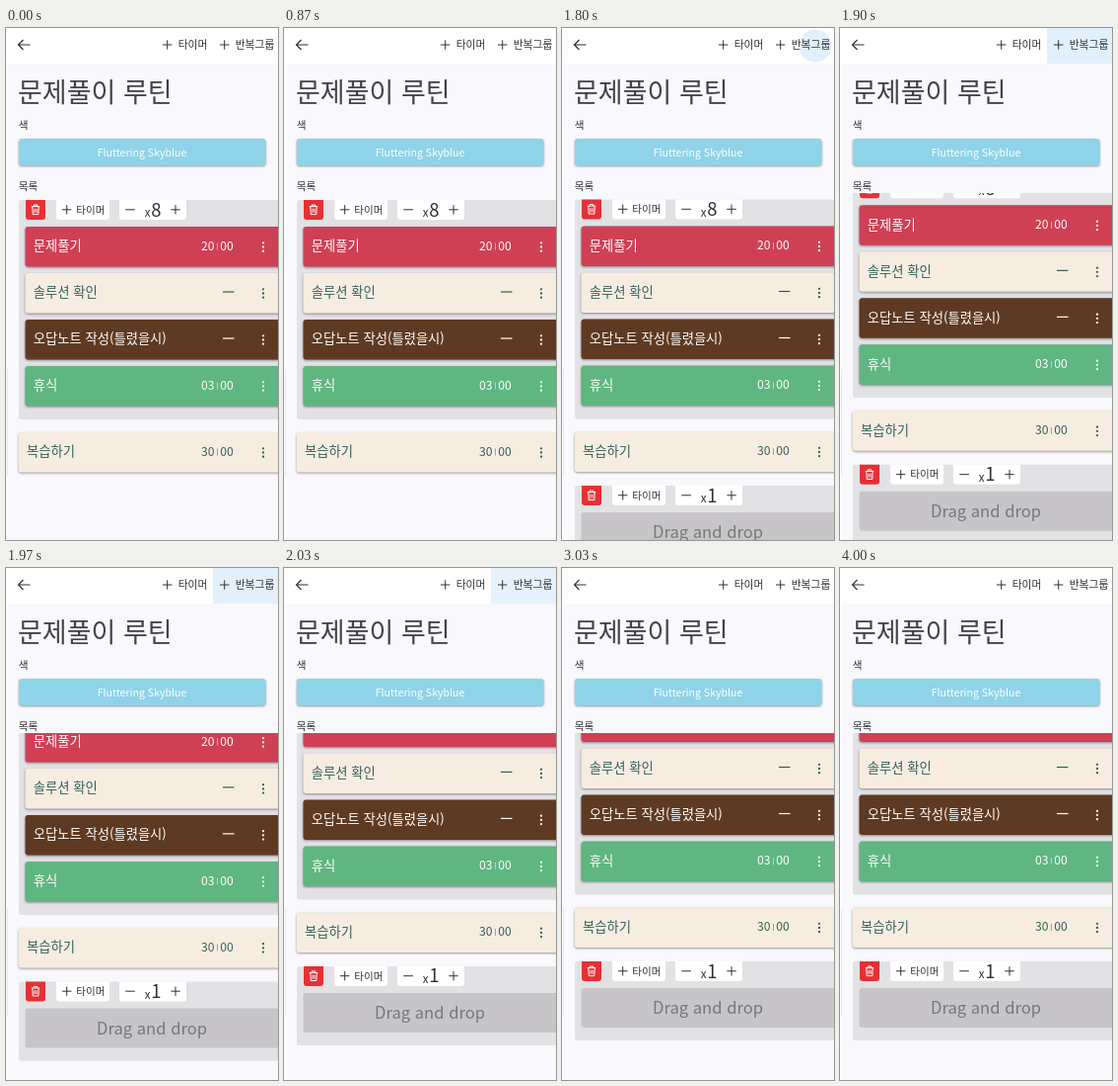
Recreate the animation shown at these times as an HTML page. Size 276 by 518 pixels, loop 4030 ms.

```html
<!DOCTYPE html>
<html lang="ko">
<head>
<meta charset="utf-8">
<style>
html, body { margin: 0; width: 100%; height: 100%; overflow: hidden; background: #f9f8fc; }
svg { display: block; width: 276px; height: 518px; font-family: "Noto Sans CJK KR", "Noto Sans CJK", "Noto Sans", sans-serif; }
.card { filter: drop-shadow(0 1px 1px rgba(0,0,0,.4)); }
</style>
</head>
<body>
<svg id="stage" viewBox="0 0 276 518"></svg>
<script>
const LOOP = 4030;
const INK = '#303034', TEAL = '#335f58', CREAM = '#f6ede0';

// Text placed by the vertical centre of its glyphs
const text = (x, y, size, str, fill = INK, extra = '') =>
  `<text x="${x}" y="${y + size * .36}" font-size="${size}" fill="${fill}" ${extra}>${str}</text>`;
const box = (x, y, w, h, fill, r = 3, extra = '') =>
  `<rect x="${x}" y="${y}" width="${w}" height="${h}" rx="${r}" fill="${fill}" ${extra}/>`;
const line = (d, color = INK, width = 1) =>
  `<path d="${d}" fill="none" stroke="${color}" stroke-width="${width}"/>`;
const plus = (x, y, r = 4.7) => line(`M${x - r} ${y}h${2 * r}M${x} ${y - r}v${2 * r}`);

function card(x, y, label, fill, color, minutes) {
  const mid = y + 20;
  const value = minutes
    ? text(198, mid - .5, 12.2, minutes, color) + text(217.2, mid - .5, 12.2, '00', color) +
      line(`M214.5 ${mid - 3.5}v7`, color, .5)
    : line(`M220 ${mid - 1}h11.5`, color, 1.2);
  const dots = [-4.2, 0, 4.2].map(d =>
    `<circle cx="261" cy="${mid + .5 + d}" r="1.15" fill="${color}"/>`).join('');
  return box(x, y, 270, 40.5, fill, 3, 'class="card"') +
    text(x + 8.3, mid - .5, 13.3, label, color, 'font-weight="500"') + value + dots;
}

// White or red tab that hangs from the top of a group
const tab = (x, y, w, fill) =>
  `<path d="M${x} ${y}h${w}v17q0 3-3 3h${6 - w}q-3 0-3-3z" fill="${fill}"/>`;

function group(y, h, count, content) {
  const mid = y + 9.8;
  const trash = `M25.8 ${mid - 3.2}h8.4M28.3 ${mid - 3.4}v-1.4h3.4v1.4` +
    `M26.8 ${mid - 3}l.4 7.8h5.6l.4-7.8M29 ${mid - 1}v4M31 ${mid - 1}v4`;
  return box(13, y, 270, h, '#e2e1e4') +
    tab(20, y, 20, '#e43136') + line(trash, '#fff') +
    tab(51, y, 54, '#fff') + plus(61.7, mid) + text(71.3, mid, 10.6, '타이머') +
    tab(115, y, 68, '#fff') + line(`M121.3 ${mid}h9.6`) +
    text(140.8, mid + 3.2, 11.5, 'x') + text(147.2, mid + .1, 18.5, count) +
    plus(172, mid) + content;
}

const firstGroup = group(174, 222, 8,
  card(19.5, 201, '문제풀기', '#cf4055', '#fff', '20') +
  card(19.5, 248, '솔루션 확인', CREAM, TEAL) +
  card(19.5, 295, '오답노트 작성(틀렸을시)', '#5f3a22', '#fff') +
  card(19.5, 342, '휴식', '#5fb681', '#fff', '03'));

const newGroup = group(463.5, 80, 1,
  box(19.5, 490.5, 270, 40, '#c7c5c8') +
  text(92, 511, 16.6, 'Drag and drop', '#77767a', 'font-weight="500"'));

stage.innerHTML = `
  <clipPath id="view"><rect y="167" width="276" height="351"/></clipPath>
  <clipPath id="button"><rect x="210" width="66" height="36"/></clipPath>
  ${box(0, 0, 276, 518, '#f9f8fc', 0)}
  ${box(0, 0, 276, 36, '#fefefe', 0)}
  ${box(0, 0, 1.5, 518, '#fff', 0)}
  ${line('M1.5 345V453', '#e4e3e7', .8)}
  <g clip-path="url(#button)"><circle id="ripple" cx="257" cy="18" fill="#e1f0fb"/></g>
  ${line('M24.5 17H12.5M17.5 12l-5 5l5 5', INK, 1.2)}
  ${plus(163.7, 17)}${text(174.7, 17.3, 10.8, '타이머', INK, 'font-weight="500"')}
  ${plus(221.7, 17)}${text(232.7, 17.3, 10.8, '반복그룹', INK, 'font-weight="500"')}
  ${text(12, 65.5, 27, '문제풀이 루틴', '#434347')}
  ${text(12.7, 98.5, 10.6, '색')}
  ${box(13, 112, 250.5, 27, '#8fd3e8', 3, 'class="card"')}
  ${text(138, 126, 10.6, 'Fluttering Skyblue', '#fff', 'text-anchor="middle" font-weight="500"')}
  ${text(12.7, 160, 10.6, '목록')}
  <g clip-path="url(#view)"><g id="list">
    ${firstGroup}
    ${card(12.7, 409, '복습하기', CREAM, TEAL, '30')}
    <g id="added">${newGroup}</g>
  </g></g>`;

const [ripple, list, added] = ['ripple', 'list', 'added'].map(id => document.getElementById(id));
const progress = (t, from, to) => Math.min(1, Math.max(0, (t - from) / (to - from)));

function draw(t) {
  const scroll = 65.5 * (1 - Math.cos(Math.PI * progress(t, 1784, 2084))) / 2;
  list.setAttribute('transform', `translate(0 ${-scroll})`);
  added.setAttribute('visibility', t >= 1765 ? 'visible' : 'hidden');
  ripple.setAttribute('r', 54 * progress(t, 1757, 1900));
  ripple.setAttribute('opacity', 1 - progress(t, 2000, 2190));
}

const start = performance.now();
function tick() {
  draw((performance.now() - start) % LOOP);
  requestAnimationFrame(tick);
}
tick();
</script>
</body>
</html>
```
